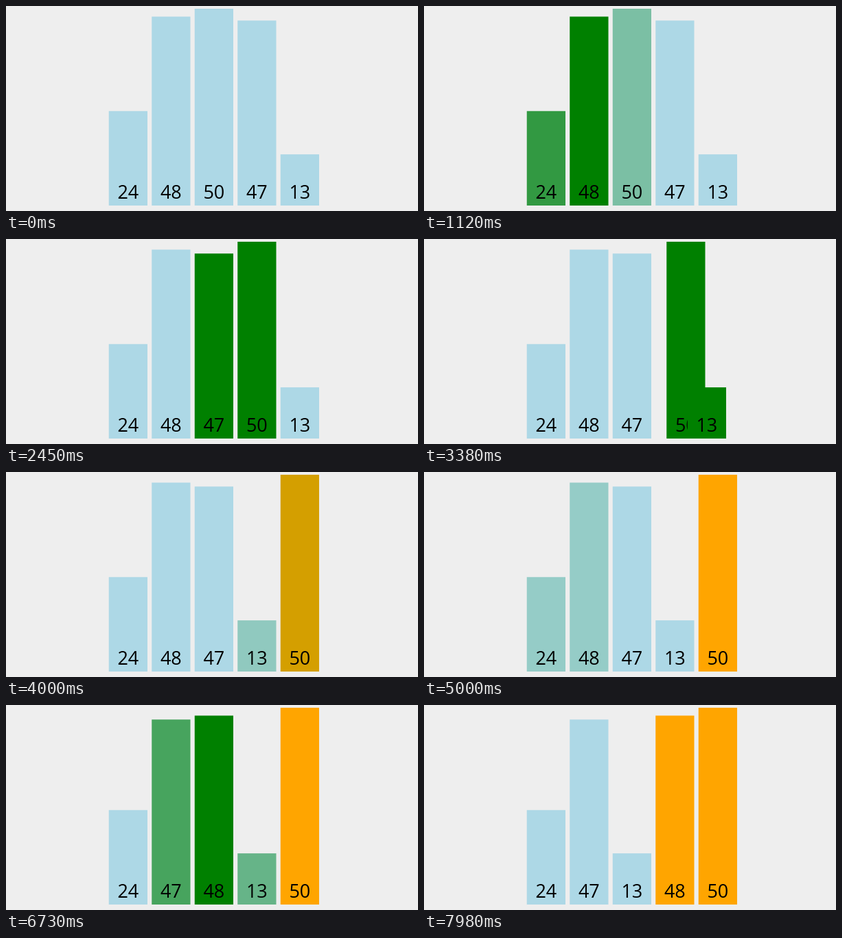
An HTML page that plays this animation: 600x300 px, repeating every 8000 ms.

```html
<!DOCTYPE html>
<html lang="en">
<head>
<meta charset="utf-8">
<title>Bubble sort</title>
<style>
  html, body { margin: 0; width: 100%; height: 100%; overflow: hidden; background: #eee; }
  svg { display: block; width: 600px; height: 300px; }
  text { font: 27px "Open Sans", "Noto Sans", sans-serif; text-anchor: middle; }
</style>
</head>
<body>
<svg viewBox="0 0 600 300"></svg>
<script>
const LOOP = 8000, DURATION = 250;
const LEFT = 149.75, PITCH = 62.5, WIDTH = 56.25, BOTTOM = 292, UNIT = 5.76;
const BLUE = [173, 216, 230], GREEN = [0, 128, 0], ORANGE = [255, 165, 0];
const values = [24, 48, 50, 47, 13];

const paint = (start, color) => ({ start, color });
const swap = (start, a, b) => ({ start, pair: [a, b] });
const steps = [
  paint(450, { 24: GREEN, 48: GREEN }),
  paint(1017, { 24: BLUE, 50: GREEN }),
  paint(1580, { 48: BLUE, 47: GREEN }),
  swap(2165, 50, 47),
  paint(2690, { 47: BLUE, 13: GREEN }),
  swap(3281, 50, 13),
  paint(3838, { 13: BLUE, 50: ORANGE }),
  paint(4920, { 24: GREEN, 48: GREEN }),
  paint(5480, { 24: BLUE, 47: GREEN }),
  swap(6055, 48, 47),
  paint(6614, { 47: BLUE, 13: GREEN }),
  swap(7160, 48, 13),
  paint(7728, { 13: BLUE, 48: ORANGE })
];

function add(parent, tag, attrs) {
  const node = document.createElementNS("http://www.w3.org/2000/svg", tag);
  for (const key in attrs) node.setAttribute(key, attrs[key]);
  return parent.appendChild(node);
}

// Later bars stay on top when two of them cross.
const bars = values.map(value => {
  const group = add(document.querySelector("svg"), "g", {});
  const height = value * UNIT;
  const rect = add(group, "rect", { y: BOTTOM - height, width: WIDTH, height });
  add(group, "text", { x: WIDTH / 2, y: 282 }).textContent = value;
  return { value, group, rect };
});

const ease = p => p < 0.5 ? 4 * p ** 3 : 1 - 4 * (1 - p) ** 3;
const mix = (a, b, p) => a + (b - a) * p;

function draw(time) {
  const state = {};
  values.forEach((value, slot) => state[value] = { slot, color: BLUE });

  for (const { start, color, pair } of steps) {
    if (time <= start) break;
    const p = ease(Math.min(1, (time - start) / DURATION));
    if (pair) {
      const [a, b] = pair.map(value => state[value]);
      [a.slot, b.slot] = [mix(a.slot, b.slot, p), mix(b.slot, a.slot, p)];
    }
    for (const value in color) {
      state[value].color = state[value].color.map((c, i) => mix(c, color[value][i], p));
    }
  }

  for (const { value, group, rect } of bars) {
    const { slot, color } = state[value];
    group.setAttribute("transform", `translate(${LEFT + slot * PITCH} 0)`);
    rect.setAttribute("fill", `rgb(${color.map(Math.round)})`);
  }
}

const origin = performance.now();
function frame() {
  draw((performance.now() - origin) % LOOP);
  requestAnimationFrame(frame);
}
frame();
</script>
</body>
</html>
```
